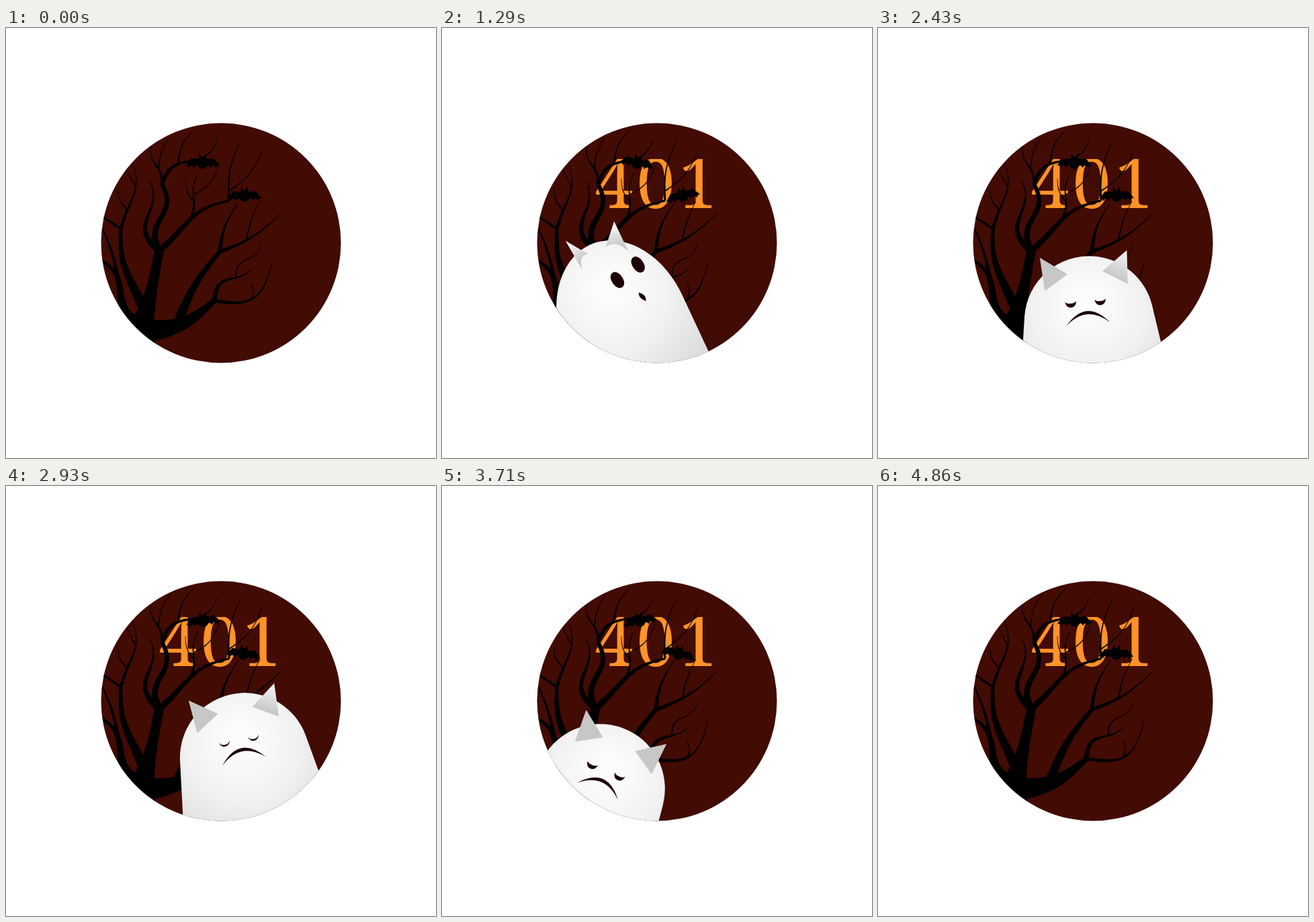
An HTML page with a canvas that plays this animation: 640x640 px, repeating every 4.93 s.

```html
<!DOCTYPE html>
<html lang="en">
<head>
<meta charset="utf-8">
<title>401</title>
<style>
  html, body { margin: 0; width: 100%; height: 100%; overflow: hidden; background: #fff; }
  canvas { display: block; width: 640px; height: 640px; }
</style>
</head>
<body>
<canvas id="stage" width="640" height="640"></canvas>
<script>
const ctx = document.getElementById('stage').getContext('2d');
const LOOP = 4930, STEP = 71.25, RAD = Math.PI / 180;
const clamp = (v, a = 0, b = 1) => Math.min(b, Math.max(a, v));
const lerp = (a, b, u) => a + (b - a) * u;
const ease = (t, from, to) => {
  const u = clamp((t - from) / (to - from));
  return u * u * (3 - 2 * u);
};
const grey = v => `rgb(${v},${v},${v})`;

// ---- Tree: every limb bends by an arc and a wave, and tapers from its parent's width
const tree = new Path2D();

function limb(x0, y0, x1, y1, arc, wave, w0, w1, power) {
  const len = Math.hypot(x1 - x0, y1 - y0);
  const nx = (y0 - y1) / len, ny = (x1 - x0) / len;
  const at = v => {
    const off = arc * Math.sin(Math.PI * v) + wave * Math.sin(2 * Math.PI * v);
    return [lerp(x0, x1, v) + nx * off, lerp(y0, y1, v) + ny * off];
  };
  const width = v => w1 + (w0 - w1) * (1 - v) ** power;
  const left = [], right = [];
  for (let i = 0; i <= 30; i++) {
    const v = i / 30, [x, y] = at(v), a = at(v - .01), b = at(v + .01);
    const k = width(v) / 2 / Math.hypot(b[0] - a[0], b[1] - a[1]);
    const dx = (a[1] - b[1]) * k, dy = (b[0] - a[0]) * k;
    left.push([x - dx, y - dy]);
    right.unshift([x + dx, y + dy]);
  }
  // same winding for every limb, so overlaps stay filled
  [...left, ...right].forEach(([x, y], i) => i ? tree.lineTo(x, y) : tree.moveTo(x, y));
  tree.closePath();
  return { at, width };
}

function grow(parent, u, x, y, arc = 0, wave = 0, tip = .7, share = .7) {
  const w = Math.max(parent.width(u) * share, tip, 1.8);
  return limb(...parent.at(u), x, y, arc, wave, w, tip, 1.2);
}

const trunk = limb(190, 485, 228, 332, 3, 0, 75, 14, 3);
grow(trunk, 1, 214, 226, -10, -9);

const crown = grow(trunk, 1, 232, 232, 1, -8, 6);
const spire = grow(crown, 1, 215, 177, 0, 3);
grow(spire, .4, 243, 163, -4);
const crest = grow(crown, 1, 315, 166, -1, -9, .7, 1);
grow(crest, .35, 280, 152, -6);

const bough = grow(trunk, 1, 332, 257, -11, 3, 3);
const fork = grow(bough, .5, 285, 218, 0, 3);
grow(fork, .4, 267, 224, -4);
grow(fork, .55, 317, 205, 7);
const hook = grow(bough, 1, 349, 168, -7, 0, .7, 1);
grow(hook, .15, 382, 179, 8);

const low = grow(trunk, .22, 310, 406, 13, 0, 8, .85);
const sweep = grow(low, 1, 396, 349, 29);
grow(sweep, .45, 364, 379, 4);
const spur = grow(low, 1, 365, 360, -11, -5, 1, .9);
grow(spur, .65, 380, 323, -4, -5);

const mid = grow(low, .45, 318, 333, -7, 0, 6);
grow(mid, 1, 346, 260, -6, 0, .7, 1);
const reach = grow(mid, 1, 409, 276, 7, 0, .7, 1);
grow(reach, .4, 378, 258, -3);

const west = grow(trunk, .4, 171, 299, -10, 2, 5, .6);
const rise = grow(west, 1, 189, 202, 9, -3, .7, 1);
grow(rise, .3, 167, 238, -5);
grow(rise, .65, 179, 209);
grow(west, 1, 141, 279, 0, 0, 3);
const edge = grow(trunk, .28, 141, 345, -2, -9, 4, .5);
grow(edge, .62, 144, 299, 3, 0, 2);

// ---- Bats
const bat = new Path2D();
for (const side of [-1, 1]) {
  bat.moveTo(0, -8);
  for (const [x, y] of [[2, -8], [4, -13], [6, -5], [17, -6], [28, 7]]) bat.lineTo(side * x, y);
  for (const x of [20, 12, 5]) bat.quadraticCurveTo(side * (x + 4), 1, side * x, 8);
  bat.lineTo(0, 10);
}

function drawBat(x, y, angle) {
  ctx.save();
  ctx.translate(x, y);
  ctx.rotate(angle * RAD);
  ctx.fill(bat);
  ctx.restore();
}

// ---- Number: digits wiped in from the baseline, one after another
function drawDigit(char, i, t) {
  const center = 256 + 62 * i, p = clamp((t - 400 - 300 * i) / 150);
  if (!p) return;
  const height = 76 * (1 - (1 - p) ** 2);
  ctx.save();
  ctx.beginPath();
  ctx.rect(center - 45, 271 - height, 90, height);
  ctx.clip();
  ctx.font = '300 102px "Noto Serif", serif';
  ctx.fillStyle = '#ff9328';
  const m = ctx.measureText(char);
  ctx.fillText(char, center - (m.actualBoundingBoxRight - m.actualBoundingBoxLeft) / 2, 268);
  ctx.restore();
}

// ---- Ghost path: time, x, y, tilt
const keys = [
  [70, 470, 640, 30],
  [500, 400, 438, 20],
  [900, 398, 437, 18],
  [1140, 346, 420, 0],
  [1290, 260, 415, -22],
  [1700, 246, 426, -24],
  [2430, 315, 436, -5],
  [2930, 356, 404, -11.5],
  [3130, 368, 398, -11],
  [3710, 235, 451, 23],
  [3850, 230, 457, 22],
  [4520, 160, 640, 15]
];

// Monotone cubic interpolation of one channel
function track(channel, time) {
  const t = clamp(time, keys[0][0], keys[keys.length - 1][0]);
  const slope = i => keys[i] && keys[i + 1]
    ? (keys[i + 1][channel] - keys[i][channel]) / (keys[i + 1][0] - keys[i][0]) : 0;
  const tangent = i => {
    const a = slope(i - 1), b = slope(i);
    return a * b > 0 ? 2 * a * b / (a + b) : 0;
  };
  let i = 0;
  while (i < keys.length - 2 && t >= keys[i + 1][0]) i++;
  const h = keys[i + 1][0] - keys[i][0], u = (t - keys[i][0]) / h, v = 1 - u;
  return v * v * ((1 + 2 * u) * keys[i][channel] + u * h * tangent(i)) +
    u * u * ((3 - 2 * u) * keys[i + 1][channel] - v * h * tangent(i + 1));
}

function drawBody(look, sad) {
  const flare = (3 * look + 6 * sad) * RAD, stretch = 30 * look * (1 - sad);
  const rx = 96.5, ry = rx + 1.15 * stretch, tail = 300;
  const footX = rx * Math.cos(flare) + tail * Math.sin(flare);
  const glow = ctx.createRadialGradient(0, -30, 20, 0, -10, 150);
  glow.addColorStop(0, '#fcfcfc');
  glow.addColorStop(.5, '#f1f1f1');
  glow.addColorStop(1, '#dcdcdc');
  ctx.fillStyle = glow;
  ctx.beginPath();
  ctx.ellipse(0, stretch, rx, ry, 0, Math.PI + flare, -flare);
  ctx.lineTo(footX, tail);
  ctx.lineTo(-footX, tail);
  ctx.fill();
}

// Tip, outer and inner corner of an ear; side is -1 or 1
function drawEar(side, turn, sad, lit) {
  const corner = (hx, hy, shift, sx, sy) =>
    [lerp(side * hx + turn * shift, side * sx, sad), lerp(hy, sy, sad)];
  const [tx, ty] = corner(39, -120, 4, 65, -100);
  const [ax, ay] = corner(37, -71, 9, 62, -50);
  const [bx, by] = corner(14, -89, 3, 26, -72);
  const mx = (ax + bx) / 2, my = (ay + by) / 2, notch = .35 * (1 - sad);
  const shade = ctx.createLinearGradient(tx, ty, mx, my);
  shade.addColorStop(.15, grey(lerp(246, lit, sad)));
  shade.addColorStop(1, grey(lerp(194, 199, sad)));
  ctx.fillStyle = shade;
  ctx.beginPath();
  ctx.moveTo(tx, ty);
  ctx.lineTo(ax, ay);
  ctx.quadraticCurveTo(lerp(mx, tx, notch), lerp(my, ty, notch), bx, by);
  ctx.fill();
}

function drawEye(x, y, w, h, tilt, lid) {
  ctx.save();
  ctx.translate(x, y);
  ctx.rotate(tilt * RAD);
  ctx.beginPath();
  ctx.moveTo(-w, 0);
  ctx.bezierCurveTo(-w, h * 1.33, w, h * 1.33, w, 0);
  ctx.bezierCurveTo(w, lid * h * 1.33, -w, lid * h * 1.33, -w, 0);
  ctx.fill();
  ctx.restore();
}

// A leaf that widens into a frown
function drawMouth(x, turn, sad) {
  const y = lerp(0, 5, sad), hx = lerp(2.5 * turn, 33, sad), hy = lerp(8, 0, sad);
  const bulge = lerp(7, 0, sad);
  ctx.beginPath();
  ctx.moveTo(x - hx, y - hy);
  ctx.quadraticCurveTo(x + bulge, y - 40 * sad, x + hx, y + hy);
  ctx.quadraticCurveTo(x - bulge, y - 30 * sad, x - hx, y - hy);
  ctx.fill();
}

function drawGhost(t) {
  const x = track(1, t), look = ease(t, 950, 1300), sad = ease(t, 1750, 2150);
  const turn = 2 * look - 1, happy = 1 - sad;
  const blink = .35 * Math.exp(-(((t - 2930) / 120) ** 2));
  const lid = lerp(-1, .4 + blink, sad);
  const faceX = (40 * turn - 6) * happy - 3 * sad;

  ctx.save();
  ctx.translate(x, track(2, t));
  ctx.rotate(track(3, t) * RAD);
  drawBody(look, sad);
  drawEar(-1, turn, sad, 199);
  drawEar(1, turn, sad, lerp(199, 240, clamp((x - 235) / 80)));

  ctx.fillStyle = '#1c0205';
  for (const side of [-1, 1]) {
    const eyeY = lerp(-42 - 5 * side * turn, -32, sad);
    drawEye(faceX + side * lerp(18.5, 22, sad), eyeY,
      8.3, lerp(13, 10, sad), -12 * turn * happy, lid);
  }
  drawMouth(faceX + (11 * turn - 4) * happy + sad, turn, sad);
  ctx.restore();
}

function draw(t) {
  ctx.fillStyle = '#fff';
  ctx.fillRect(0, 0, 640, 640);
  ctx.save();
  ctx.beginPath();
  ctx.arc(320, 320, 178.5, 0, Math.PI * 2);
  ctx.fillStyle = '#420b04';
  ctx.fill();
  ctx.clip();

  [...'401'].forEach((char, i) => drawDigit(char, i, t));
  ctx.fillStyle = '#000';
  ctx.fill(tree);
  const sway = Math.sin(t / LOOP * Math.PI * 2);
  drawBat(292.5 - 2 * sway, 200, 11 * sway);
  drawBat(355 + 3 * sway, 249, -13 * sway);
  drawGhost(t);
  ctx.restore();
}

const began = performance.now();
function tick() {
  const t = (performance.now() - began) % LOOP;
  draw(Math.floor((t + 1) / STEP) * STEP);
  requestAnimationFrame(tick);
}
tick();
</script>
</body>
</html>
```
